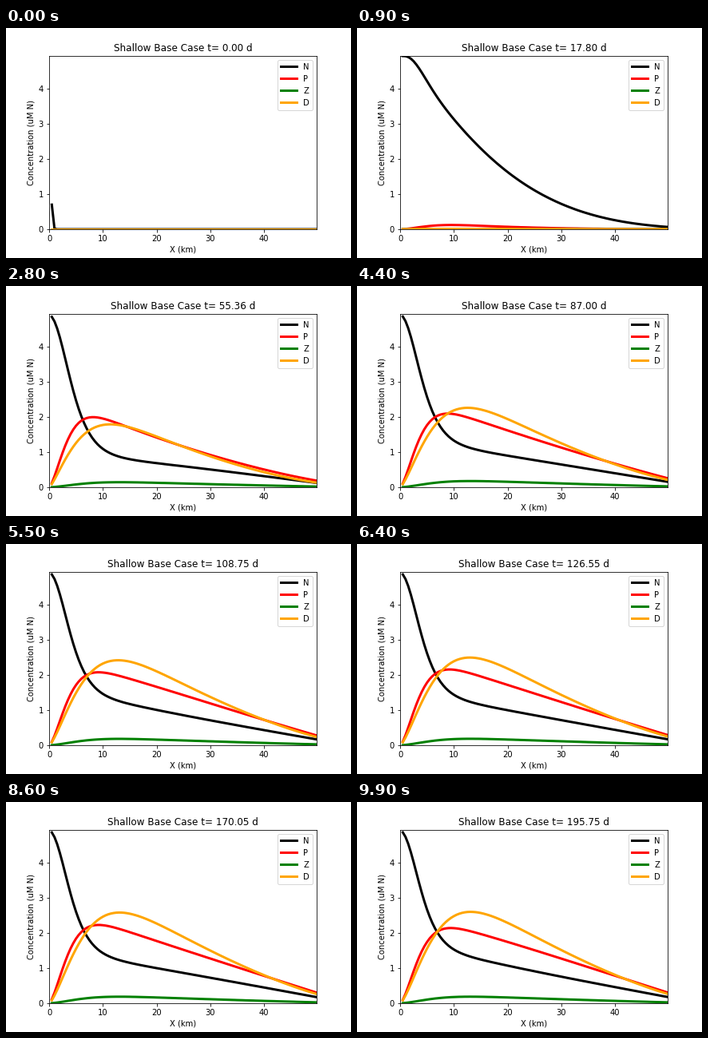
These frames come from a looping animation (432x288 px, 10000 ms). A matplotlib script:

```python
import math

import matplotlib.pyplot as plt
import numpy as np
from matplotlib.animation import FuncAnimation

FRAMES, INTERVAL = 100, 100
DAYS_PER_FRAME = 43.5 / 22
T_BLOOM, T_MID = 16 * DAYS_PER_FRAME, 28 * DAYS_PER_FRAME
RELAX = 37.0        # days, slow approach to the steady state
DIFFUSION = 13.0    # km^2 per day
T_FIRST = 0.0044    # first model step, days

x = np.arange(0.5, 50.1, 0.5)


def nutrient(coast, width, offshore, reach):
    """Rich water at the coast above a linear offshore decline."""
    return coast / np.cosh(x / width) ** 2 + offshore * (1 - x / reach)


def plume(amp, reach, power, width, steep):
    """Rise away from the coast, then decline towards the open boundary."""
    rise = 1 - np.exp(-(x / width) ** steep)
    return amp * (1 - x / reach) ** power * rise


def bump(peak, k):
    r = x / peak
    return r ** k * np.exp(k * (1 - r))


def logistic(z):
    return 1 / (1 + math.exp(-z))


def spread(t):
    """Tracer diffusing in from the coast."""
    width = 2 * math.sqrt(DIFFUSION * (t + T_FIRST))
    return np.array([math.erfc(d / width) for d in x])


def growth(t):
    return 0.45 * (t - 23.5)


# daily mean N, P and D
bloom = np.array([nutrient(4.27, 5.8, 0.66, 60),
                  plume(3.35, 70, 2.7, 6.45, 1.7),
                  plume(1.41, 70, 2.8, 7.95, 1.54)])
mid = np.array([nutrient(3.78, 4.8, 1.12, 56),
                plume(2.53, 60, 1.47, 3.95, 1.5),
                plume(3.0, 60, 1.77, 6.74, 1.33)])
steady = np.array([nutrient(3.32, 4.5, 1.595, 56),
                   plume(2.77, 56, 1, 4.24, 1.5),
                   plume(4.3, 58, 1.42, 7.8, 1.42)])
day_cycle = np.array([-0.074 * bump(11, 1.8), 0.08 * bump(6.5, 1.1), 0 * x])
grazers = plume(1.45, 58, 1.2, 7.3, 1.6)


def means(t):
    """Daily mean fields and the strength of the day cycle."""
    if t < T_BLOOM:
        z, z_end = growth(t), growth(T_BLOOM)
        g = logistic(z) / logistic(z_end)
        d = math.log1p(math.exp(z)) / math.log1p(math.exp(z_end))
        n, p, det = bloom * spread(t) / spread(T_BLOOM)
        return np.array([n + (1 - g) * p + (1 - d) * det, g * p, d * det]), g
    if t < T_MID:
        s = (t - T_BLOOM) / (T_MID - T_BLOOM)
        return bloom + (1.6 * s - 0.6 * s * s) * (mid - bloom), 1
    return steady + math.exp(-(t - T_MID) / RELAX) * (mid - steady), 1


def state(t):
    fields, strength = means(t)
    n, p, d = fields + strength * math.sin(2 * math.pi * t) * day_cycle
    level = 0.19 - 0.03 * math.exp(-(t - T_MID) / 30)
    z = level * logistic(0.15 * (t - 40)) * grazers
    return [np.maximum(c, 0).round(3) for c in (n, p, z, d)]


fig, ax = plt.subplots(figsize=(6, 4), dpi=72)
fig.subplots_adjust(left=0.125, right=0.9, bottom=0.125, top=0.88)
colors = {"N": "black", "P": "red", "Z": "green", "D": "orange"}
lines = [ax.plot(x, 0 * x, color=col, lw=3, label=c)[0] for c, col in colors.items()]
ax.set(xlim=(0, 49.75), ylim=(0, 4.94), xlabel="X (km)", ylabel="Concentration (uM N)")
ax.set_xticks(range(0, 50, 10))
ax.set_yticks(range(5))
ax.legend(loc="upper right")
title = ax.set_title("")


def update(i):
    t = i * DAYS_PER_FRAME
    for line, values in zip(lines, state(t)):
        line.set_ydata(values)
    title.set_text(f"Shallow Base Case t= {t:.2f} d")
    return [*lines, title]


anim = FuncAnimation(fig, update, frames=FRAMES, interval=INTERVAL, repeat=True, repeat_delay=0)
plt.show()
```
